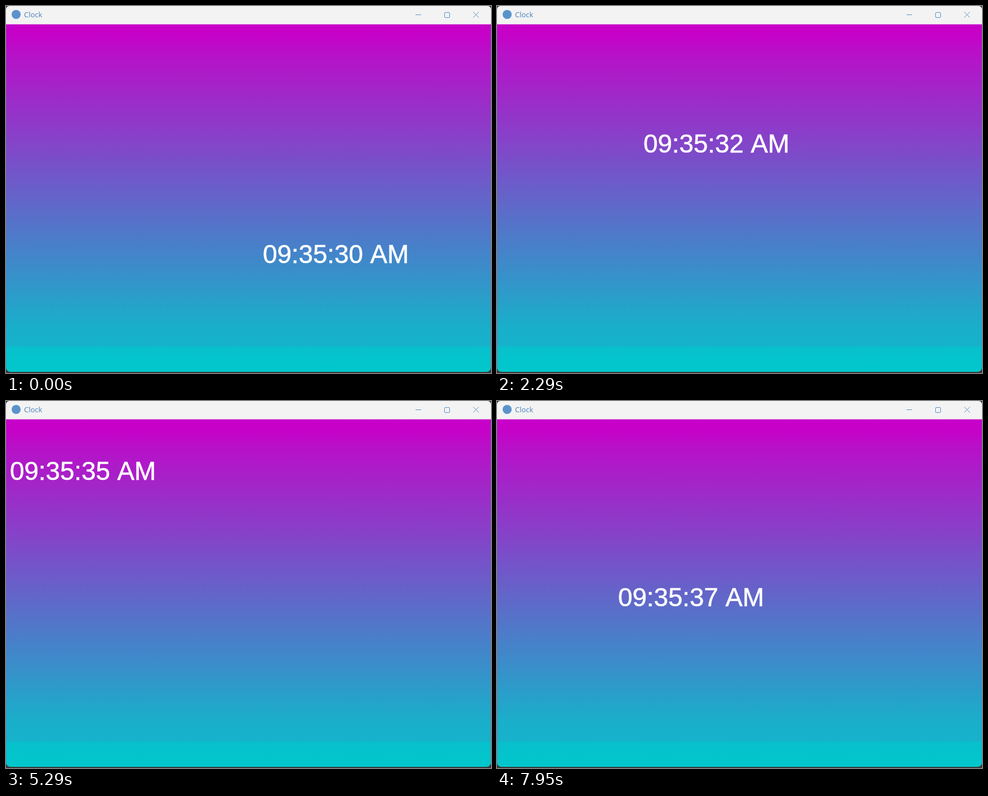
Write an HTML page with a canvas that moves like this. It is 861x651 px and loops after 8000 ms.

```html
<!DOCTYPE html>
<html lang="en">
<head>
<meta charset="utf-8">
<title>Clock</title>
<style>
  html, body { margin: 0; width: 100%; height: 100%; overflow: hidden; background: #383838; }
  canvas { display: block; width: 861px; height: 651px; }
</style>
</head>
<body>
<canvas id="stage" width="861" height="651"></canvas>
<script>
const W = 861, H = 651, LOOP = 8000;
const TITLE_H = 33, BOTTOM = 649;
const REFRESH = 70, PHASE = 40;           // ms between redraws, offset of the first
const SPEED = 0.0841, LEAD = 4;           // px per ms on each axis, quick gain at the start
const FIRST_SECOND = 30, NEXT_SECOND_AT = 1120;

const ctx = document.getElementById("stage").getContext("2d");

function refreshTime(t) {
  return Math.max(0, Math.floor((t - PHASE) / REFRESH) * REFRESH + PHASE);
}

function travelled(t) {
  return Math.round(SPEED * t + Math.min(LEAD, t / 50));
}

function makeGradient() {
  const g = ctx.createLinearGradient(0, TITLE_H, 0, BOTTOM);
  const stop = (y, color) => g.addColorStop((y - TITLE_H) / (BOTTOM - TITLE_H), color);
  stop(TITLE_H, "rgb(200,0,200)");
  stop(52, "rgb(198,2,200)");
  stop(80, "rgb(185,15,200)");
  stop(570, "rgb(25,175,202)");
  stop(603.5, "rgb(22,178,203)");
  stop(604, "rgb(8,192,204)");
  stop(BOTTOM, "rgb(0,200,204)");
  return g;
}
const gradient = makeGradient();

function line(x0, y0, x1, y1) {
  ctx.beginPath();
  ctx.moveTo(x0, y0);
  ctx.lineTo(x1, y1);
  ctx.stroke();
}

function drawTitleBar() {
  ctx.fillStyle = "#f3f3f3";
  ctx.fillRect(0, 0, W, TITLE_H - 1);
  ctx.fillStyle = "#de7ade";
  ctx.fillRect(0, TITLE_H - 1, W, 1);

  ctx.fillStyle = "#5a93cb";
  ctx.beginPath();
  ctx.arc(18, 15, 8, 0, Math.PI * 2);
  ctx.fill();

  ctx.fillStyle = "#4a80bd";
  ctx.font = '13px "Open Sans", sans-serif';
  ctx.fillText("Clock", 32, 20);

  ctx.strokeStyle = "#5a90c8";
  ctx.lineWidth = 1;
  line(727, 15.5, 737, 15.5);
  ctx.beginPath();
  ctx.roundRect(778.5, 11.5, 9, 9, 1.5);
  ctx.stroke();
  line(829.5, 10.5, 839.5, 20.5);
  line(839.5, 10.5, 829.5, 20.5);
}

function drawTime(t) {
  // Folding the distance makes the text bounce off the left and top walls.
  const d = travelled(t);
  const left = 1 + Math.abs(457 - d);
  const top = 40.5 + Math.abs(382.5 - d);
  const second = FIRST_SECOND + Math.max(0, Math.floor((t - NEXT_SECOND_AT) / 1000) + 1);
  const label = `09:35:${second} AM`;
  ctx.font = '45.7px "Liberation Sans", Arial, sans-serif';
  ctx.fillStyle = ctx.strokeStyle = "#fff";
  ctx.lineWidth = 0.6;
  ctx.fillText(label, left - 2, top + 33);
  ctx.strokeText(label, left - 2, top + 33);
}

function draw(t) {
  ctx.fillStyle = "#383838";
  ctx.fillRect(0, 0, W, H);
  ctx.save();
  ctx.beginPath();
  ctx.roundRect(0, 0, W, BOTTOM, [6, 6, 8, 8]);
  ctx.clip();
  ctx.fillStyle = gradient;
  ctx.fillRect(0, TITLE_H, W, BOTTOM - TITLE_H);
  ctx.fillStyle = "rgba(100,115,200,0.4)";
  ctx.fillRect(0, TITLE_H, 1, BOTTOM - TITLE_H);
  ctx.fillRect(W - 1, TITLE_H, 1, BOTTOM - TITLE_H);
  drawTitleBar();
  drawTime(refreshTime(t));
  ctx.restore();
}

const start = performance.now();
function frame() {
  draw((performance.now() - start) % LOOP);
  requestAnimationFrame(frame);
}
draw(0);
requestAnimationFrame(frame);
</script>
</body>
</html>
```
